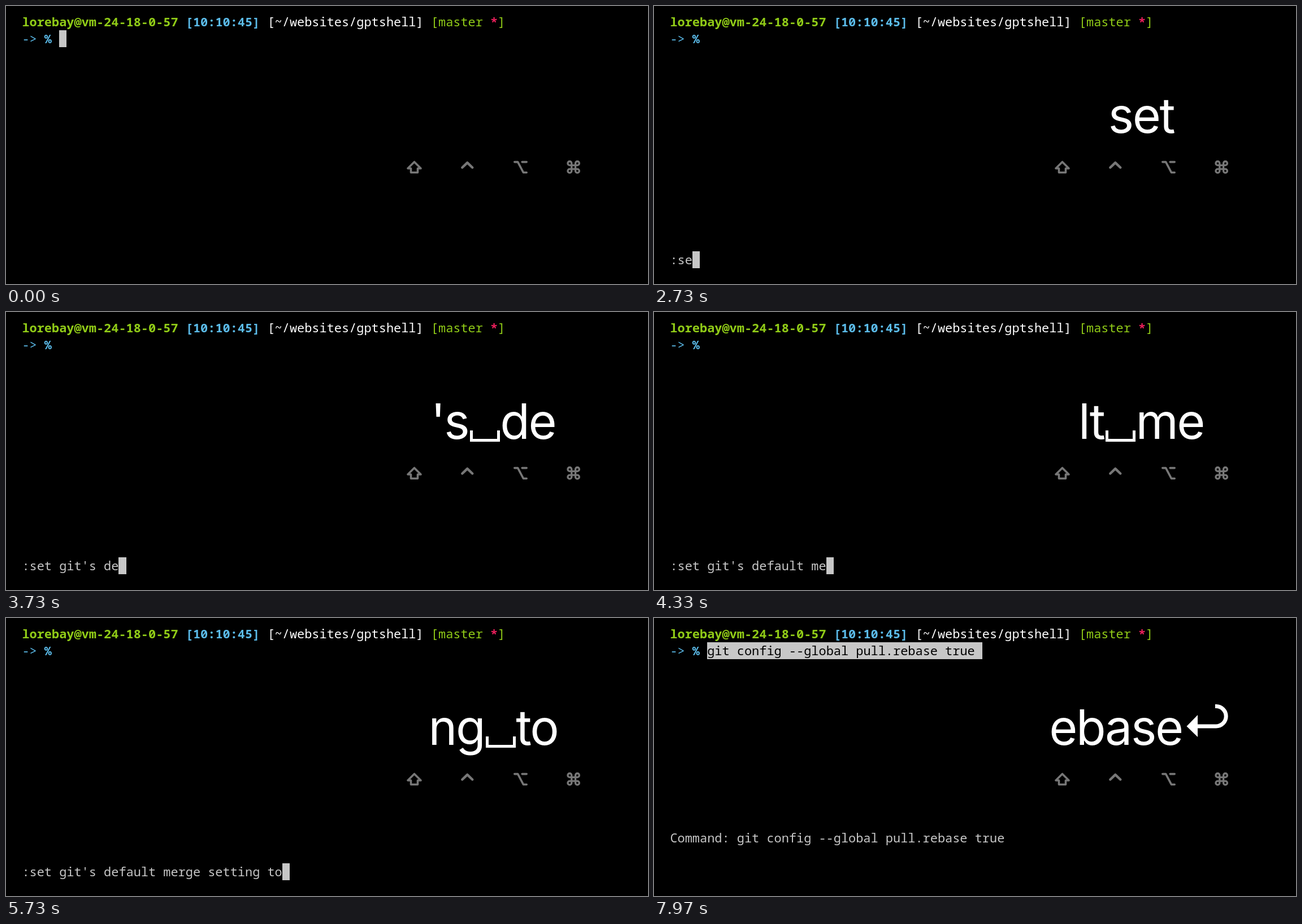
Animation, 1136 px wide and 493 px high, one loop 8000 ms. Source, as an HTML page:

```html
<!DOCTYPE html>
<html lang="en">
<head>
<meta charset="utf-8">
<title>Terminal session</title>
<style>
html, body { margin: 0; width: 100%; height: 100%; overflow: hidden; background: #000; }
#stage { position: relative; width: 1136px; height: 493px; overflow: hidden; background: #000; }
.row {
  position: absolute; left: 28.4px; height: 30.1px; line-height: 30.1px;
  font-family: "Noto Sans Mono", "DejaVu Sans Mono", monospace; font-size: 21.93px;
  white-space: pre; color: #c7c7c7; font-variant-ligatures: none;
}
.row b { font-weight: 700; }
.green { color: #90cb17; }
.blue { color: #5bbbe9; }
.white { color: #fff; }
.red { color: #ee1f5c; }
.picked { color: #000; }
#cursor { position: absolute; width: 13.2px; height: 30px; background: #c7c7c7; }
#keys {
  position: absolute; left: 462px; top: 143.7px; width: 800px; height: 100px;
  line-height: 100px; font-family: Inter, "Liberation Sans", sans-serif; font-size: 86px;
  letter-spacing: -2.4px; text-align: center; white-space: nowrap; color: #fff;
}
.space {
  display: inline-block; box-sizing: border-box; width: 53px; height: 20px;
  margin-left: 3px; vertical-align: -5px; border: solid #fff; border-width: 0 5.5px 5.5px;
}
.enter { display: inline-block; width: 75px; height: 72px; margin: 0 8px 0 7px; vertical-align: baseline; }
#mods { position: absolute; left: 0; top: 0; fill: none; stroke-width: 3.6; stroke-linecap: round; stroke-linejoin: round; }
</style>
</head>
<body>
<div id="stage">
  <div id="cursor"></div>
  <svg id="mods" width="1136" height="493" stroke="#777">
    <path d="M722.5 276.5 L734 288 H728.5 V295.3 H716.5 V288 H711 Z"/>
    <path d="M807.3 286.5 L816.3 277.8 L825.3 286.5" stroke-width="4.4"/>
    <path id="option" d="M899.8 276.6 H905.6 L915.4 295.2 H921.2 M913.2 276.6 H921.2"/>
    <g id="command" transform="translate(1004.2 285.7)" stroke-width="3.3">
      <path d="M-3.4 -3.4 H3.4 V3.4 H-3.4 Z"/>
    </g>
  </svg>
  <div id="keys"></div>
</div>
<script>
const LOOP = 8000, LEFT = 28.4, TOP = 13.3, COL = 13.158, ROW = 30.1;
const REQUEST = "set git's default merge setting to rebase";
const ANSWER = "git config --global pull.rebase true";
const OPTION_DOWN = 930, OPTION_UP = 1900, OPEN = 1500, ECHO = 35, REPLY = 7240;

// [keys pressed, time in ms]; the last key is Enter
const PACE = [[1, 2450], [3, 2715], [12, 3685], [20, 4285], [29, 5225], [40, 6250], [42, 6480]];
const ENTER = PACE[PACE.length - 1][1];

const $ = id => document.getElementById(id);
const stage = $("stage"), cursor = $("cursor"), keys = $("keys"), option = $("option");

function addRow(row, html = "", col = 0) {
  const el = document.createElement("div");
  el.className = "row";
  el.style.left = LEFT + col * COL + "px";
  el.style.top = TOP + row * ROW + "px";
  el.innerHTML = html;
  stage.append(el);
  return el;
}

addRow(0, '<b class="green">lorebay@vm-24-18-0-57</b> <b class="blue">[10:10:45]</b> ' +
  '<span class="white">[~/websites/gptshell]</span> ' +
  '<span class="green">[master <b class="red">*</b>]</span>');
addRow(1, '<span class="blue">-&gt; <b>%</b></span>');
const typed = addRow(1, "", 5);
typed.classList.add("picked");
const result = addRow(12);
const entry = addRow(14);

for (let turn = 0; turn < 360; turn += 90) {
  $("command").insertAdjacentHTML("beforeend",
    `<path transform="rotate(${turn})" d="M-3.4 -3.4 H-6.8 A3.4 3.4 0 1 1 -3.4 -6.8 Z"/>`);
}

const SPACE = '<span class="space"></span>';
const RETURN = '<svg class="enter" viewBox="0 0 75 72">' +
  '<path d="M0.5 39 L20 19 V58 Z" fill="#fff"/>' +
  '<path d="M18 39 H52.5 A17.7 17.7 0 0 0 52.5 3.6 H51" fill="none" stroke="#fff" stroke-width="7"/></svg>';

function pressed(t) {
  if (t < PACE[0][1]) return 0;
  for (let i = 1; i < PACE.length; i++) {
    const [k0, t0] = PACE[i - 1], [k1, t1] = PACE[i];
    if (t < t1) return Math.floor(k0 + (k1 - k0) * (t - t0) / (t1 - t0));
  }
  return REQUEST.length + 1;
}

function keysHtml(count) {
  const recent = REQUEST.slice(0, count).slice(-5).replace(/ /g, SPACE);
  return recent + (count > REQUEST.length ? RETURN : "");
}

function setText(el, text) {
  if (el.textContent !== text) el.textContent = text;
}

function placeCursor(row, col, cols = 1) {
  cursor.style.left = LEFT + col * COL + "px";
  cursor.style.top = TOP + row * ROW + "px";
  cursor.style.width = cols * COL + "px";
}

let shown = -1;
function render(t) {
  const count = pressed(t);
  if (count !== shown) {
    keys.innerHTML = keysHtml(count);
    shown = count;
  }
  option.style.stroke = t >= OPTION_DOWN && t < OPTION_UP ? "#fff" : "";

  const asking = t >= OPEN && t < ENTER + ECHO;
  const line = asking ? ":" + REQUEST.slice(0, pressed(t - ECHO)) : "";
  const done = t >= REPLY;
  setText(entry, line);
  setText(typed, done ? ANSWER : "");
  setText(result, done ? "Command: " + ANSWER : "");

  if (asking) placeCursor(14, line.length);
  else placeCursor(1, 5, done ? ANSWER.length + 1 : 1);
}

const start = performance.now();
function tick(now) {
  render(Math.max(0, now - start) % LOOP);
  requestAnimationFrame(tick);
}
render(0);
requestAnimationFrame(tick);
</script>
</body>
</html>
```
